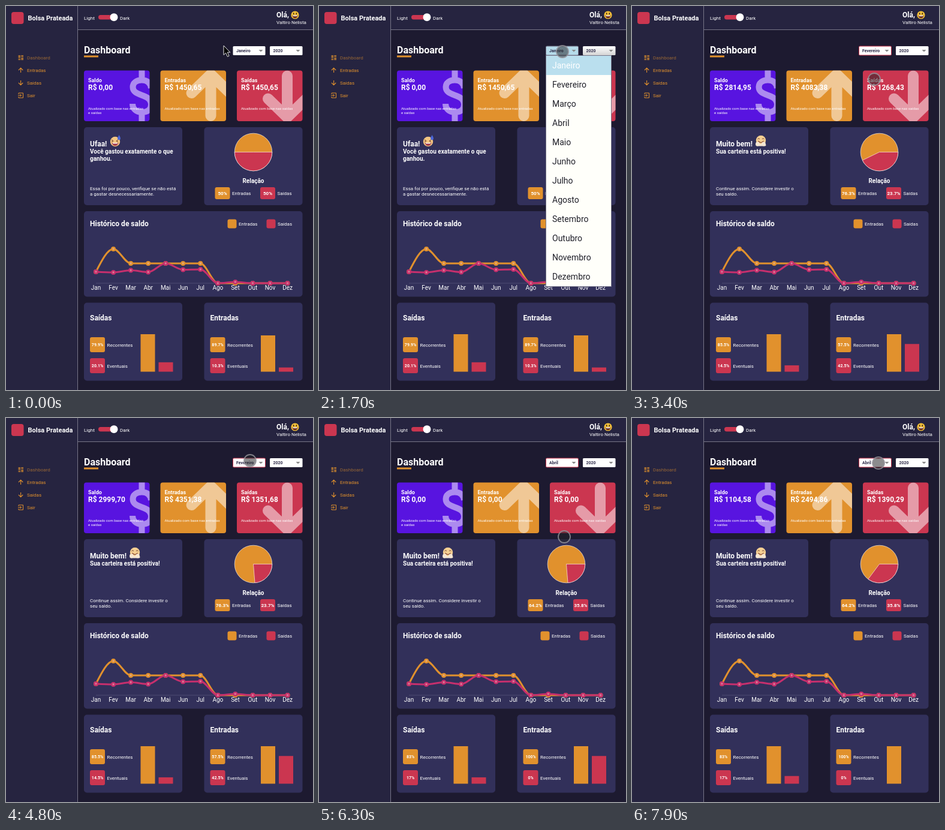
Animation, 512 px wide and 640 px high, one loop 8000 ms. Source, as an HTML page:

```html
<!DOCTYPE html>
<html lang="pt">
<head>
<meta charset="utf-8">
<style>
html, body { margin: 0; width: 100%; height: 100%; overflow: hidden; background: #1d1a30; }
svg { display: block; width: 512px; height: 640px; font-family: Roboto, Arial, sans-serif; }
</style>
</head>
<body>
<svg id="stage" viewBox="0 0 512 640"></svg>
<script>
const ORANGE = '#e1912d', RED = '#cb3650', PINK = '#c62f6d', PURPLE = '#5814e0', CARD = '#32305a';
const months = ['Janeiro', 'Fevereiro', 'Março', 'Abril', 'Maio', 'Junho', 'Julho', 'Agosto',
  'Setembro', 'Outubro', 'Novembro', 'Dezembro'];

const happy = { title: 'Muito bem!', sub: ['Sua carteira está positiva!'],
  foot: ['Continue assim. Considere investir o', 'seu saldo.'], face: 'glad' };
const even = { title: 'Ufaa!', sub: ['Você gastou exatamente o que', 'ganhou.'],
  foot: ['Essa foi por pouco, verifique se não está', 'a gastar desnecessariamente.'], face: 'sweat' };

// income, expense, recurring shares and bar heights for each chosen month
const states = [
  { at: -9000, month: 0, income: 1450.65, spent: 1450.65, share: ['50%', '50%'], msg: even,
    pct: ['79.9%', '20.1%', '89.7%', '10.3%'], bars: [62.5, 15.7, 60.5, 7] },
  { at: 2600, month: 1, income: 4351.38, spent: 1351.68, share: ['76.3%', '23.7%'], msg: happy,
    pct: ['85.5%', '14.5%', '57.5%', '42.5%'], bars: [62.5, 10.6, 62.5, 46.2] },
  { at: 6300, month: 3, income: 2502.202, spent: 1394.375, share: ['64.2%', '35.8%'], msg: happy,
    pct: ['83%', '17%', '100%', '0%'], bars: [62.5, 12.8, 62.5, 0] }
];

// time, x, y, glide (1 = move steadily from the previous point)
const moves = [[0, 363, 66], [500, 363, 67], [900, 404, 77, 1], [1500, 406, 76], [1800, 406, 78],
  [1900, 409, 99], [2100, 405, 131], [2300, 406, 134], [2400, 407, 138], [2900, 407, 138],
  [3400, 404, 122, 1], [4200, 407, 71, 1], [5000, 407, 71], [5100, 407, 70], [5500, 420, 204, 1],
  [5900, 413, 200], [6000, 408, 197], [6300, 409, 198], [7100, 409, 198], [7700, 411, 75, 1]];
const arrowTimes = [[0, 500], [1800, 2700], [5100, 6300]];
const popups = [
  { from: 1700, to: 2600, lit: 1900, rows: [[1700, 0], [1900, 1]] },
  { from: 5000, to: 6300, lit: 5300, rows: [[5000, 1], [5300, 2], [5400, 3]] }
];

const clamp = v => Math.max(0, Math.min(1, v));
const mix = (a, b, k) => a + (b - a) * k;
const last = (list, t) => list.filter(e => e[0] <= t).pop();
const expo = k => k >= 1 ? 1 : (1 - 2 ** (-10 * k)) * 1024 / 1023;
// cubic-bezier(.25, .1, .25, 1)
function ease(x) {
  let lo = 0, hi = 1, s;
  for (let i = 0; i < 24; i++) {
    s = (lo + hi) / 2;
    const px = .75 * s * (1 - s) ** 2 + .75 * s * s * (1 - s) + s ** 3;
    if (px < x) lo = s; else hi = s;
  }
  return .3 * s * (1 - s) ** 2 + 3 * s * s * (1 - s) + s ** 3;
}

const rect = (x, y, w, h, fill, r = 0, more = '') =>
  `<rect x="${x}" y="${y}" width="${w}" height="${h}" rx="${r}" fill="${fill}" ${more}/>`;
const dot = (x, y, r, fill, more = '') => `<circle cx="${x}" cy="${y}" r="${r}" fill="${fill}" ${more}/>`;
const line = (d, color, w, more = '') => `<path d="${d}" fill="none" stroke="${color}" stroke-width="${w}" ${more}/>`;
const text = (x, y, size, str, more = '', fill = '#fff') =>
  `<text x="${x}" y="${y}" font-size="${size}" fill="${fill}" ${more}>${str}</text>`;
const bold = (x, y, size, str, more = '', fill) => text(x, y, size, str, 'font-weight="700" ' + more, fill);
const MID = 'text-anchor="middle"';
const badge = (x, y, w, h, fill, str, size) =>
  rect(x, y, w, h, fill, 3) + bold(x + w / 2, y + h / 2 + size * .36, size, str, MID);

// monotone curve through evenly spaced points
function curve(ys, x0, step) {
  const s = ys.slice(1).map((y, i) => (y - ys[i]) / step);
  const m = ys.map((_, i) => {
    const a = s[i - 1], b = s[i];
    if (a === undefined || b === undefined || a * b <= 0) return 0;
    return Math.sign(a) * 2 * Math.min(Math.abs(a), Math.abs(b), Math.abs(a + b) / 4);
  });
  m[0] = (3 * s[0] - m[1]) / 2;
  const h = step / 3;
  return `M${x0} ${ys[0]}` + s.map((_, i) => {
    const x = x0 + i * step;
    return `C${x + h} ${ys[i] + m[i] * h} ${x + 2 * h} ${ys[i + 1] - m[i + 1] * h} ${x + step} ${ys[i + 1]}`;
  }).join('');
}
function series(ys, color) {
  const step = 29.05;
  return line(curve(ys, 150, step), color, 3) + ys.map((y, i) =>
    dot(150 + i * step, y, 2.7, '#e8b9b5', `stroke="${color}" stroke-width="2.6"`) +
    dot(150 + i * step, y, .8, color)).join('');
}

const faces = {
  smile: dot(482, 15, 6.6, '#f4c239') +
    '<ellipse cx="479.7" cy="12.6" rx="1" ry="1.7" fill="#4a2d16"/><ellipse cx="484.3" cy="12.6" rx="1" ry="1.7" fill="#4a2d16"/>' +
    '<path d="M477.4 15.6H486.6Q486 20.3 482 20.3T477.4 15.6Z" fill="#6b2a1b"/>' + rect(478.4, 15.6, 7.2, 1.5, '#fff'),
  sweat: dot(182, 226, 8.2, '#f3c582') + line('M176 223L179 225L176 226.5M187 223L184 225L187 226.5', '#6b3b2a', 1) +
    '<path d="M176.5 228H187.5Q186 233 182 233T176.5 228Z" fill="#a33b4a"/>' + rect(178, 228, 8, 1.4, '#fff') +
    '<path d="M188.5 215Q192.5 221 190 223Q186 224 186 220Z" fill="#4b66d8"/>',
  glad: dot(215, 224, 8.2, '#f5cf92') + line('M209.5 222Q211.5 219 213 222M217 222Q218.5 219 220.5 222', '#6b3b2a', 1) +
    line('M210.5 225Q215 230 219.5 225', '#8a4a35', 1.2) +
    dot(209.5, 230, 3.4, '#f6e7d3') + dot(219.5, 230, 3.4, '#f6e7d3') + rect(206.5, 230, 17, 3.6, '#f6e7d3', 1.8)
};

function fixedParts() {
  const menu = ['Dashboard', 'Entradas', 'Saídas', 'Sair'].map((s, i) =>
    text(35, 89 + 21 * i, 8, s, i ? '' : 'opacity=".6"', ORANGE)).join('');
  const icons =
    `<g opacity=".65">${rect(20.5, 82, 3.6, 4.6, ORANGE) + rect(25.2, 82, 3.8, 2.8, ORANGE) +
      rect(20.5, 87.6, 3.6, 2.6, ORANGE) + rect(25.2, 85.8, 3.8, 4.4, ORANGE)}</g>` +
    line('M24.6 111V103.5M21 107L24.6 103.4L28.2 107M24.6 124V131.5M21 128L24.6 131.6L28.2 128', ORANGE, 1.1) +
    line('M21 147V145H28.5V153H21V151M20 149H25.5M23.5 147L25.5 149L23.5 151', ORANGE, 1);
  const heads = [[130, PURPLE, 'Saldo', 'entradas'], [257.5, ORANGE, 'Entradas', 'entradas'], [385, RED, 'Saídas', 'saídas']];
  const totals = heads.map(([x, color, name, from], i) => rect(x, 107.5, 109.5, 84.5, color, 4) +
    bold(x + 7, 127, 9, name) + text(x + 7, 173, 6, 'Atualizado com base nas ' + from) +
    (i ? '' : text(137, 180, 6, 'e saídas'))).join('');
  const up = 'M341.5 183V116M309.5 145L341.5 114L373.5 145';
  const down = 'M469 116.5V183M437 154.5L469 185.5L501 154.5';
  const dollar = 'M242 137C241 127 234 123.5 226.5 123.5C217 123.5 211.5 128.5 211.5 135C211.5 152 242 145 242 164.5C242 172 236 177 227 177C217 177 211 171 211 163';
  const marks = '<clipPath id="cards">' + heads.map(h => rect(h[0], 107.5, 109.5, 84.5, '#fff', 4)).join('') + '</clipPath>' +
    '<g clip-path="url(#cards)"><g opacity=".5">' + line(dollar + 'M226.5 107V121M226.5 179V193', '#fff', 10) +
    `</g><g opacity=".5">${line(up + down, '#fff', 18, 'stroke-linecap="round"')}</g></g>`;
  const panels = [[130, 202, 164, 130], [330.5, 202, 164, 130], [130, 342, 364.5, 142.5],
    [130, 494.5, 164, 130], [330.5, 494.5, 164, 130]].map(p => rect(...p, CARD, 5)).join('');
  const labels = [[377, 315, 'Entradas'], [452.5, 315, 'Saídas'], [388, 366, 'Entradas'], [453, 366, 'Saídas'],
    [168.5, 568, 'Recorrentes'], [168.5, 603, 'Eventuais'], [369, 568, 'Recorrentes'], [369, 603, 'Eventuais']]
    .map(([x, y, s]) => text(x, y, 8, s)).join('');
  const chart = line('M150 462H469.5', '#5b597b', .7) +
    series([443, 405, 429, 429, 429, 429, 429, 462, 462, 462, 462, 462], ORANGE) +
    series([443, 444, 440.5, 443.5, 429, 439.5, 439, 462, 460, 462, 462, 462], PINK) +
    months.map((m, i) => text(150 + 29.05 * i, 473, 10, m.slice(0, 3), MID)).join('');

  return rect(0, 0, 512, 640, '#1d1a30') + rect(0, 0, 512, 39, '#262440') + rect(0, 0, 119, 640, '#262440') +
    rect(119, 0, 1, 640, '#777687') + rect(120, 39, 392, 1, '#777687') +
    rect(9, 10, 20.5, 20, RED, 4) + bold(36.5, 24, 11, 'Bolsa Prateada') + icons + menu +
    text(130, 23, 8, 'Light') + rect(154, 15, 32, 7.5, RED, 3.7) + dot(180, 18.7, 6.5, '#fff') + text(190, 23, 8, 'Dark') +
    bold(451, 19, 12, 'Olá,') + faces.smile + text(451, 30, 8, 'Valtiro Nelista') +
    bold(130, 79, 16, 'Dashboard') + rect(130, 82.5, 24, 3, ORANGE) +
    totals + marks + panels + labels + bold(412.5, 295, 10, 'Relação', MID) +
    bold(140, 367, 12, 'Histórico de saldo') + rect(369.5, 355.5, 15, 15, ORANGE, 3) + rect(434.5, 355.5, 15, 15, RED, 3) +
    chart + bold(140, 524, 12, 'Saídas') + bold(340.5, 524, 12, 'Entradas');
}

const money = v => 'R$ ' + v.toFixed(2).replace('.', ',');
const spentAngle = s => 2 * Math.PI * s.spent / (s.income + s.spent);

function figures(t, now, old) {
  const age = t - now.at;
  const k = expo(clamp((age - .03) / 2000));
  const a = mix(spentAngle(old), spentAngle(now), ease(clamp((age - 515) / 1500)));
  const grow = ease(clamp((age - 115) / 400));
  const { title, sub, foot, face } = now.msg;
  const cx = 412.5, cy = 243.5, r = 31.3, rim = 'stroke="#fff" stroke-width=".6"';
  const x = cx + r * Math.cos(a), y = cy + r * Math.sin(a);
  return [now.income - now.spent, now.income, now.spent].map((v, i) => bold(137 + 127.5 * i, 140, 12, money(v * k))).join('') +
    bold(140, 234, 12, title) + faces[face] +
    sub.map((s, i) => bold(140, 246 + 12 * i, 10, s)).join('') +
    foot.map((s, i) => text(140, 307 + 9 * i, 8, s)).join('') +
    dot(cx, cy, r, ORANGE, rim) +
    `<path d="M${cx} ${cy}H${cx + r}A${r} ${r} 0 ${a > Math.PI ? 1 : 0} 1 ${x} ${y}Z" fill="${RED}" ${rim}/>` +
    now.share.map((s, i) => badge(348.5 + 75.5 * i, 302, 25, 20, i ? RED : ORANGE, s, 8)).join('') +
    now.pct.map((s, i) => {
      const side = i >> 1, row = i % 2, color = row ? RED : ORANGE;
      const h = mix(old.bars[i], now.bars[i], grow);
      return badge(140 + 200.5 * side, 552 + 35 * row, 25, 25, color, s, 7) +
        rect(224.5 + 200.5 * side + 30 * row, 609.5 - h, 24, h, color);
    }).join('');
}

function select(x, w, str, fill, edge) {
  return rect(x, 67, w, 15, fill, 1.5, edge ? `stroke="${edge}"` : '') +
    bold(x + 5.5, 77, 7, str, '', '#2d2a48') + `<path d="M${x + w - 11} 73H${x + w - 4}L${x + w - 7.5} 76.5Z" fill="#888"/>`;
}

function popup(t, p) {
  const hot = last(p.rows, t)[1];
  return rect(378.5, 82.5, 109, 385, '#fffffa', 0, 'stroke="#77768a"') +
    rect(379, 83 + 32 * hot, 108, 32, '#badfee') +
    months.map((m, i) => text(389, 104 + 32 * i, 14, m, '', i === hot ? '#fff' : '#20202a')).join('');
}

function pointer(t) {
  const i = moves.filter(m => m[0] <= t).length - 1;
  let [t0, x, y] = moves[i];
  const next = moves[i + 1];
  if (next && next[3]) {
    const k = (t - t0) / (next[0] - t0);
    x = mix(x, next[1], k);
    y = mix(y, next[2], k);
  }
  if (arrowTimes.some(([a, b]) => t >= a && t < b))
    return `<path transform="translate(${x} ${y})" d="M0 0V15.5L3.6 12.2L6.4 18.4L9 17.2L6.3 11.2H10.8Z" fill="#000" stroke="#fff" stroke-width=".9"/>`;
  return dot(x, y, 10, 'rgba(35,35,38,.52)', 'stroke="#929098" stroke-opacity=".85" stroke-width="1.8"');
}

const stage = document.getElementById('stage');
stage.innerHTML = fixedParts() +
  '<defs><linearGradient id="grey" x2="0" y2="1"><stop stop-color="#fff"/><stop offset="1" stop-color="#d4d4d4"/></linearGradient></defs><g id="live"></g>';
const live = document.getElementById('live');

function draw(t) {
  const n = states.filter(s => s.at <= t).length - 1;
  const now = states[n], open = popups.find(p => t >= p.from && t < p.to);
  const pressed = open && t < open.lit;
  const edge = t >= 1700 ? RED : '';
  live.innerHTML = figures(t, now, states[Math.max(0, n - 1)]) +
    select(378.5, 54, months[now.month], pressed ? '#b5dbea' : '#fff', pressed ? '#77768a' : edge) +
    select(440, 54.5, '2020', pressed ? 'url(#grey)' : '#fff') +
    (open ? popup(t, open) : '') + pointer(t);
}

const start = performance.now();
let shown = -1;
function tick() {
  const t = Math.floor((performance.now() - start) % 8000 / 100) * 100;
  if (t !== shown) draw(shown = t);
  requestAnimationFrame(tick);
}
tick();
</script>
</body>
</html>
```
